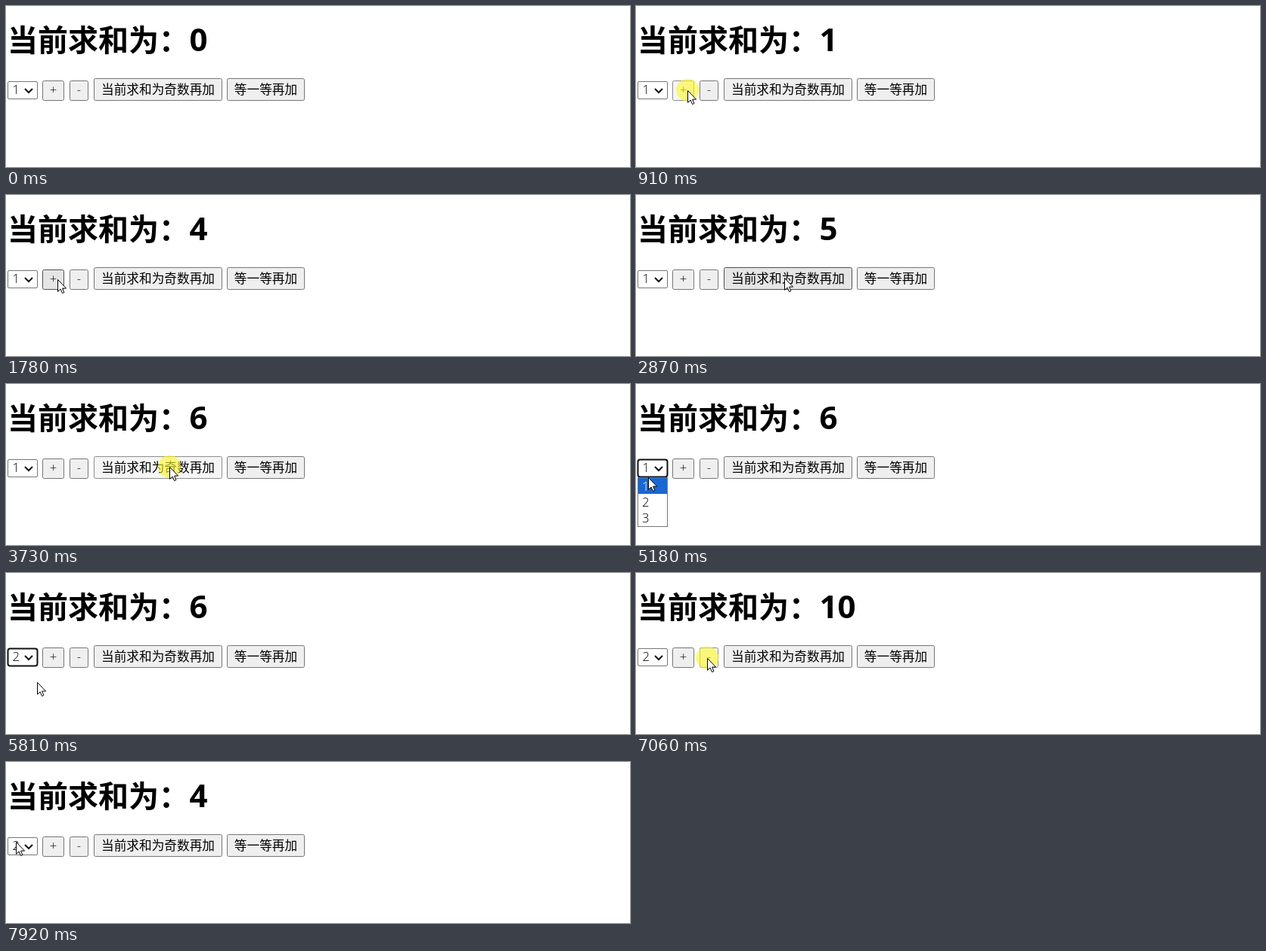
Write an HTML page that moves like this. It is 825 px wide and 214 px high and loops after 7.99 s.

```html
<!DOCTYPE html>
<html lang="zh-CN">
<head>
<meta charset="utf-8">
<title>求和</title>
<style>
  html, body { margin: 0; width: 100%; height: 100%; overflow: hidden; background: #fff; }
  svg { display: block; width: 825px; height: 214px; }
  text { font: 350 16.67px "Open Sans", "Noto Sans CJK SC", "Noto Sans CJK", sans-serif; white-space: pre; }
  .title { font-size: 40px; font-weight: 700; }
  #sum { font-size: 42px; }
  .cjk { font-family: "Noto Sans CJK SC", "Noto Sans CJK", sans-serif; }
  .btn text { text-anchor: middle; }
  .btn rect { fill: #efefef; stroke: #767676; }
  .btn.hover rect { fill: #e5e5e5; stroke: #4f4f4f; }
  .btn.down rect { fill: #f5f5f5; stroke: #8d8d8d; }
  #box { fill: #fff; stroke: #767676; }
  #box.focus { stroke: #101010; stroke-width: 2; rx: 3px; }
  .opt rect { fill: #fff; }
  .opt.on rect { fill: #1967d2; }
  .opt.on text { fill: #fff; }
</style>
</head>
<body>
<svg viewBox="0 0 825 214">
  <text class="title cjk" x="2" y="59.5">当前求和为：</text>
  <text class="title" id="sum" x="242.5" y="59.5"></text>
  <rect id="box" x="2.5" y="100.5" width="39" height="23" rx="1.5"/>
  <text id="step" x="8.5" y="117"></text>
  <path d="M25 110l5 5 5-5" fill="none" stroke="#101010" stroke-width="2"/>
  <g id="buttons"></g>
  <g id="list"></g>
  <circle id="spot" cx="-.7" cy=".7" r="15" fill="rgb(252,247,45)" fill-opacity=".62"/>
  <path id="cursor" d="M-.5 1.5V17.4L3.1 14l2.4 5.6 2.4-1-2.3-5.5h5z" fill="#fff" stroke="#000"/>
</svg>
<script>
const LOOP = 7990, TICK = 76.6, BOTTOM = 126, LIST_TOP = 125, ROW = 21.3;
const $ = id => document.getElementById(id);

const BUTTONS = [
  { label: '+', x: 48, w: 29, h: 27, change: s => s.step },
  { label: '-', x: 84, w: 25, h: 27, change: s => -s.step },
  { label: '当前求和为奇数再加', x: 116, w: 170, h: 30, change: s => s.sum % 2 ? s.step : 0 },
  { label: '等一等再加', x: 292, w: 103, h: 30, change: s => s.step }
];
// start, ticks, end x, end y
const MOVES = [
  [70, 1, 296, 164], [146, 6, 69, 111], [2560, 7, 217, 109], [4260, 1, 212, 109],
  [4565, 3, 5, 113], [4795, 2, 11, 111], [5180, 5, 30, 150], [5810, 1, 42, 144],
  [5885, 3, 66, 113], [6660, 2, 95, 112], [7685, 4, 14, 105]
];
// start, hold time, number of clicks in a row
const CLICKS = [
  [760, 75, 2], [1160, 150], [1630, 150], [2410, 75], [3100, 150], [3730, 70],
  [3950, 75, 2], [4410, 80], [5030, 80], [5660, 150], [6120, 75, 2], [6435, 155],
  [6910, 0], [7060, 90], [7380, 75, 2]
].flatMap(([start, hold, count = 1]) =>
  Array.from({ length: count }, (_, i) => [start + 2 * i * hold, start + (2 * i + 1) * hold]));

$('buttons').innerHTML = BUTTONS.map(({ label, x, w, h }) =>
  `<g class="btn"><rect x="${x + .5}" y="${BOTTOM - h + .5}" width="${w - 1}" height="${h - 1}" rx="2"/>` +
  `<text class="${label.length > 1 ? 'cjk' : ''}" x="${x + w / 2}" y="117">${label}</text></g>`).join('');

$('list').innerHTML = [1, 2, 3].map((n, i) => {
  const y = LIST_TOP + i * ROW;
  return `<g class="opt"><rect x="3" y="${y}" width="38" height="${ROW}"/>` +
    `<text x="8" y="${y + 16.5}">${n}</text></g>`;
}).join('') + '<rect x="2.5" y="124.5" width="39" height="65" fill="none" stroke="#767676"/>';

const buttons = document.querySelectorAll('.btn');
const options = document.querySelectorAll('.opt');
const show = (el, on) => el.setAttribute('visibility', on ? 'visible' : 'hidden');
const easeOut = p => 1 - (1 - p) ** 1.6;
const rowAt = y => Math.max(0, Math.floor((y - LIST_TOP) / ROW));
const buttonAt = ([x, y]) =>
  BUTTONS.find(b => x >= b.x && x < b.x + b.w && y >= BOTTOM - b.h && y < BOTTOM);

function pointer(t) {
  let x = 296, y = 164;
  for (const [start, n, endX, endY] of MOVES) {
    if (t < start) break;
    const p = easeOut(Math.min(n, Math.floor((t - start) / TICK) + 1) / n);
    x += (endX - x) * p;
    y += (endY - y) * p;
  }
  return [Math.round(x), Math.round(y)];
}

// Replays every click up to time t.
function stateAt(t) {
  const s = { sum: 0, step: 1, open: false, focus: false, down: false };
  for (const [press, release] of CLICKS) {
    if (t < press) break;
    const at = pointer(press), button = buttonAt(at);
    s.focus = !button;
    s.down = t < release;
    if (s.down) break;
    if (button) {
      s.sum += button.change(s);
    } else {
      if (s.open) s.step = rowAt(at[1]) + 1;
      s.open = !s.open;
    }
  }
  return s;
}

function draw(t) {
  const s = stateAt(t), at = pointer(t), seen = t >= MOVES[0][0];
  const over = seen && buttonAt(at);

  $('sum').textContent = s.sum;
  $('step').textContent = s.step;
  $('box').setAttribute('class', s.focus ? 'focus' : '');
  buttons.forEach((el, i) => {
    const look = BUTTONS[i] !== over ? '' : s.down ? ' down' : ' hover';
    el.setAttribute('class', 'btn' + look);
  });

  show($('list'), s.open);
  options.forEach((el, i) => el.setAttribute('class', i === rowAt(at[1]) ? 'opt on' : 'opt'));

  for (const id of ['cursor', 'spot']) $(id).setAttribute('transform', `translate(${at})`);
  show($('cursor'), seen);
  show($('spot'), s.down);
}

function frame() {
  draw(performance.now() % LOOP);
  requestAnimationFrame(frame);
}
draw(0);
requestAnimationFrame(frame);
</script>
</body>
</html>
```
